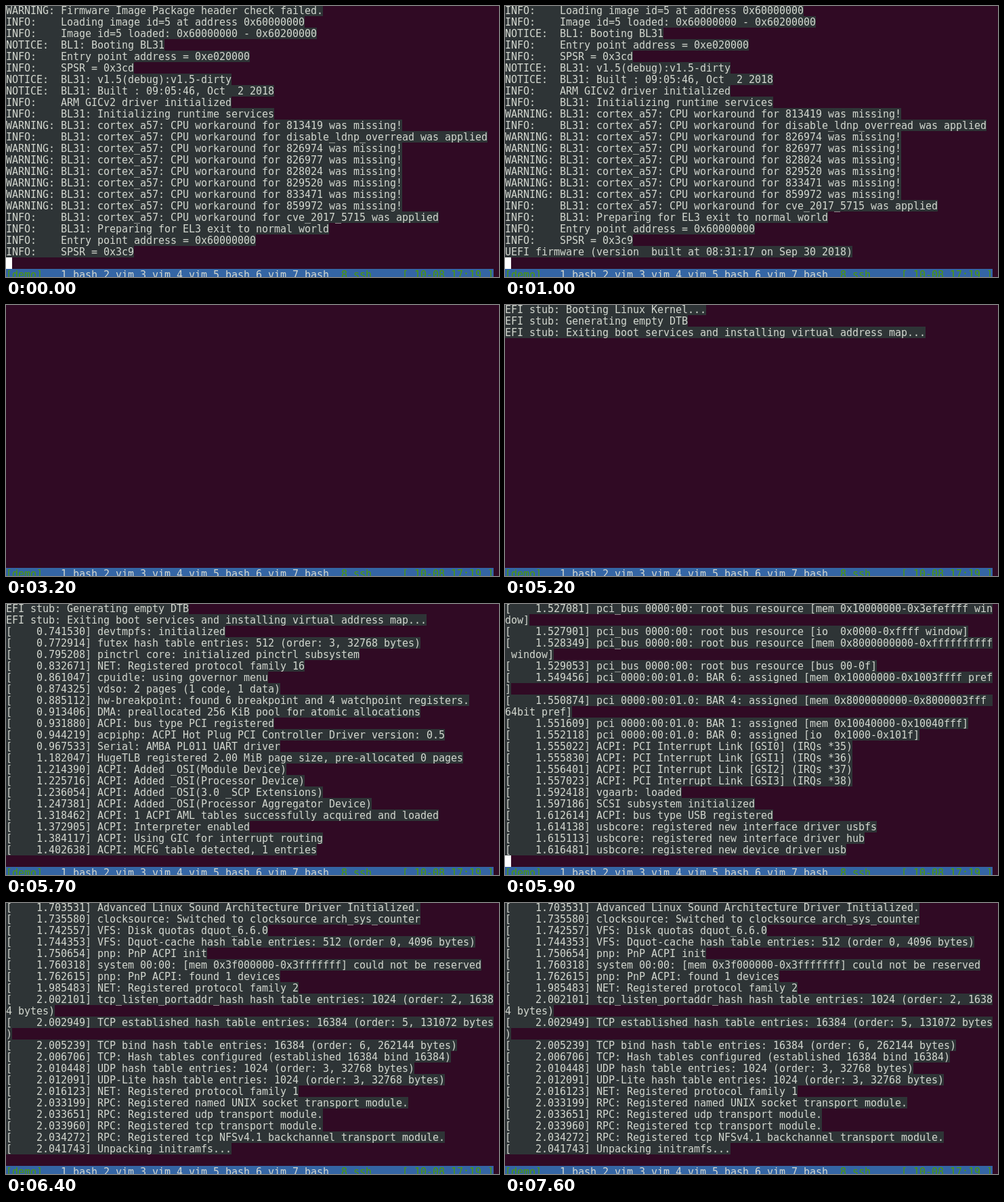
An HTML page with a canvas for the animation above (8 s loop, 728x401 px).

```html
<!DOCTYPE html>
<html lang="en">
<head>
<meta charset="utf-8">
<title>Boot console</title>
<style>
  html, body { margin: 0; width: 100%; height: 100%; overflow: hidden; background: #300a24; }
  canvas { display: block; }
</style>
</head>
<body>
<canvas id="stage" width="728" height="401"></canvas>
<script>
const LOOP = 8000, CELL_W = 9, CELL_H = 17, TOP = -2, COLS = 80, ROWS = 22;
const COLOR = {
  back: '#300a24', cell: '#2e3436', text: '#d3d7cf',
  bar: '#3465a4', green: '#4e9a06', cursor: '#ffffff'
};

const lines = text => text.trim().split('\n');

const workaround = id => `WARNING: BL31: cortex_a57: CPU workaround for ${id} was missing!`;
const applied = id => `INFO:    BL31: cortex_a57: CPU workaround for ${id} was applied`;

const firmware = [
  ...lines(`
WARNING: Firmware Image Package header check failed.
INFO:    Loading image id=5 at address 0x60000000
INFO:    Image id=5 loaded: 0x60000000 - 0x60200000
NOTICE:  BL1: Booting BL31
INFO:    Entry point address = 0xe020000
INFO:    SPSR = 0x3cd
NOTICE:  BL31: v1.5(debug):v1.5-dirty
NOTICE:  BL31: Built : 09:05:46, Oct  2 2018
INFO:    ARM GICv2 driver initialized
INFO:    BL31: Initializing runtime services`),
  workaround(813419),
  applied('disable_ldnp_overread'),
  ...[826974, 826977, 828024, 829520, 833471, 859972].map(workaround),
  applied('cve_2017_5715'),
  ...lines(`
INFO:    BL31: Preparing for EL3 exit to normal world
INFO:    Entry point address = 0x60000000
INFO:    SPSR = 0x3c9
UEFI firmware (version  built at 08:31:17 on Sep 30 2018)`)
];

const stub = lines(`
EFI stub: Booting Linux Kernel...
EFI stub: Generating empty DTB
EFI stub: Exiting boot services and installing virtual address map...`);

// Each entry starts with its time stamp in seconds.
const kernel = lines(`
0.741530 devtmpfs: initialized
0.772914 futex hash table entries: 512 (order: 3, 32768 bytes)
0.795208 pinctrl core: initialized pinctrl subsystem
0.832671 NET: Registered protocol family 16
0.861047 cpuidle: using governor menu
0.874325 vdso: 2 pages (1 code, 1 data)
0.885112 hw-breakpoint: found 6 breakpoint and 4 watchpoint registers.
0.913406 DMA: preallocated 256 KiB pool for atomic allocations
0.931880 ACPI: bus type PCI registered
0.944219 acpiphp: ACPI Hot Plug PCI Controller Driver version: 0.5
0.967533 Serial: AMBA PL011 UART driver
1.182047 HugeTLB registered 2.00 MiB page size, pre-allocated 0 pages
1.214390 ACPI: Added _OSI(Module Device)
1.225716 ACPI: Added _OSI(Processor Device)
1.236054 ACPI: Added _OSI(3.0 _SCP Extensions)
1.247381 ACPI: Added _OSI(Processor Aggregator Device)
1.318462 ACPI: 1 ACPI AML tables successfully acquired and loaded
1.372905 ACPI: Interpreter enabled
1.384117 ACPI: Using GIC for interrupt routing
1.402638 ACPI: MCFG table detected, 1 entries
1.446210 ARMH0011:00: ttyAMA0 at MMIO 0x9000000 (irq = 5) is a SBSA
1.478352 ACPI: PCI Root Bridge [PCI0] (domain 0000 [bus 00-ff])
1.491027 acpi PNP0A08:00: _OSC: OS supports [ExtendedConfig ASPM ClockPM MSI]
1.503418 acpi PNP0A08:00: ECAM at [mem 0x3f000000-0x3fffffff] for [bus 00-0f]
1.518236 Remapped I/O 0x000000003eff0000 to [io  0x0000-0xffff window]
1.525904 PCI host bridge to bus 0000:00
1.527081 pci_bus 0000:00: root bus resource [mem 0x10000000-0x3efeffff window]
1.527901 pci_bus 0000:00: root bus resource [io  0x0000-0xffff window]
1.528349 pci_bus 0000:00: root bus resource [mem 0x8000000000-0xffffffffff window]
1.529053 pci_bus 0000:00: root bus resource [bus 00-0f]
1.549456 pci 0000:00:01.0: BAR 6: assigned [mem 0x10000000-0x1003ffff pref]
1.550874 pci 0000:00:01.0: BAR 4: assigned [mem 0x8000000000-0x8000003fff 64bit pref]
1.551609 pci 0000:00:01.0: BAR 1: assigned [mem 0x10040000-0x10040fff]
1.552118 pci 0000:00:01.0: BAR 0: assigned [io  0x1000-0x101f]
1.555022 ACPI: PCI Interrupt Link [GSI0] (IRQs *35)
1.555830 ACPI: PCI Interrupt Link [GSI1] (IRQs *36)
1.556401 ACPI: PCI Interrupt Link [GSI2] (IRQs *37)
1.557023 ACPI: PCI Interrupt Link [GSI3] (IRQs *38)
1.592418 vgaarb: loaded
1.597186 SCSI subsystem initialized
1.612614 ACPI: bus type USB registered
1.614138 usbcore: registered new interface driver usbfs
1.615113 usbcore: registered new interface driver hub
1.616481 usbcore: registered new device driver usb
1.626941 pps_core: LinuxPPS API ver. 1 registered
1.627282 pps_core: Software ver. 5.3.6 - Copyright 2005-2007 Lorando Bresteni <bres@mail.example>
1.639894 PTP clock support registered
1.641665 EDAC MC: Ver: 3.0.0
1.663037 Registered efivars operations
1.703531 Advanced Linux Sound Architecture Driver Initialized.
1.735580 clocksource: Switched to clocksource arch_sys_counter
1.742557 VFS: Disk quotas dquot_6.6.0
1.744353 VFS: Dquot-cache hash table entries: 512 (order 0, 4096 bytes)
1.750654 pnp: PnP ACPI init
1.760318 system 00:00: [mem 0x3f000000-0x3fffffff] could not be reserved
1.762615 pnp: PnP ACPI: found 1 devices
1.985483 NET: Registered protocol family 2
2.002101 tcp_listen_portaddr_hash hash table entries: 1024 (order: 2, 16384 bytes)
2.002949 TCP established hash table entries: 16384 (order: 5, 131072 bytes)
2.005239 TCP bind hash table entries: 16384 (order: 6, 262144 bytes)
2.006706 TCP: Hash tables configured (established 16384 bind 16384)
2.010448 UDP hash table entries: 1024 (order: 3, 32768 bytes)
2.012091 UDP-Lite hash table entries: 1024 (order: 3, 32768 bytes)
2.016123 NET: Registered protocol family 1
2.033199 RPC: Registered named UNIX socket transport module.
2.033651 RPC: Registered udp transport module.
2.033960 RPC: Registered tcp transport module.
2.034272 RPC: Registered tcp NFSv4.1 backchannel transport module.
2.041743 Unpacking initramfs...`);

const bootUntil = seconds => [
  ...stub,
  ...kernel.filter(line => parseFloat(line) <= seconds)
    .map(line => `[    ${line.slice(0, 8)}] ${line.slice(9)}`)
];

// Console contents from each moment on, in ms.
const timeline = [
  [0, firmware.slice(0, -1)],
  [200, firmware],
  [3200, []],
  [3500, stub.slice(0, 1)],
  [3600, stub.slice(0, 2)],
  [3700, stub],
  [5700, bootUntil(1.43)],
  [5800, bootUntil(1.52)],
  [5900, bootUntil(1.62)],
  [6000, bootUntil(1.71)],
  [6100, bootUntil(1.77)],
  [6300, bootUntil(2.007)],
  [6400, bootUntil(3)]
].map(([start, log]) => ({ start, rows: log.flatMap(wrap).slice(-ROWS) }));

function wrap(line) {
  const rows = [];
  for (let i = 0; i < line.length; i += COLS) rows.push(line.slice(i, i + COLS));
  return rows;
}

// Blinks every 600 ms, but stays lit while the firmware waits.
function cursorOn(t) {
  if (t >= 2200 && t < 3200) return true;
  return Math.floor((t + 800) / 600) % 2 === 1;
}

const ctx = document.getElementById('stage').getContext('2d');

function fillCells(col, row, count, color) {
  ctx.fillStyle = color;
  ctx.fillRect(col * CELL_W, TOP + row * CELL_H, count * CELL_W, CELL_H);
}

function print(text, col, row, color) {
  ctx.fillStyle = color;
  const y = TOP + row * CELL_H + 14;
  for (let i = 0; i < text.length; i++) {
    if (text[i] !== ' ') ctx.fillText(text[i], (col + i) * CELL_W, y);
  }
}

function drawStatus() {
  const row = ROWS + 1;
  fillCells(0, row, COLS, COLOR.bar);
  print('[demo]', 0, row, COLOR.green);
  print('1 bash 2 vim 3 vim 4 vim 5 bash 6 vim 7 bash', 9, row, COLOR.text);
  print('8 ssh', 55, row, COLOR.green);
  print('[ 10-08 17:19 ]', 65, row, COLOR.green);
}

function draw(rows, cursor) {
  ctx.fillStyle = COLOR.back;
  ctx.fillRect(0, 0, 728, 401);
  ctx.font = '15px "DejaVu Sans Mono", monospace';
  // All backgrounds come first, so that no row covers the underscores above it.
  rows.forEach((text, row) => fillCells(0, row, text.length, COLOR.cell));
  rows.forEach((text, row) => print(text, 0, row, COLOR.text));
  if (cursor) fillCells(0, rows.length, 1, COLOR.cursor);
  drawStatus();
}

let shown = '';
const begin = performance.now();

function tick() {
  const t = (performance.now() - begin) % LOOP;
  const scene = timeline.filter(s => s.start <= t).pop();
  const cursor = cursorOn(t);
  const key = scene.start + ':' + cursor;
  if (key !== shown) {
    draw(scene.rows, cursor);
    shown = key;
  }
  requestAnimationFrame(tick);
}
tick();
</script>
</body>
</html>
```
